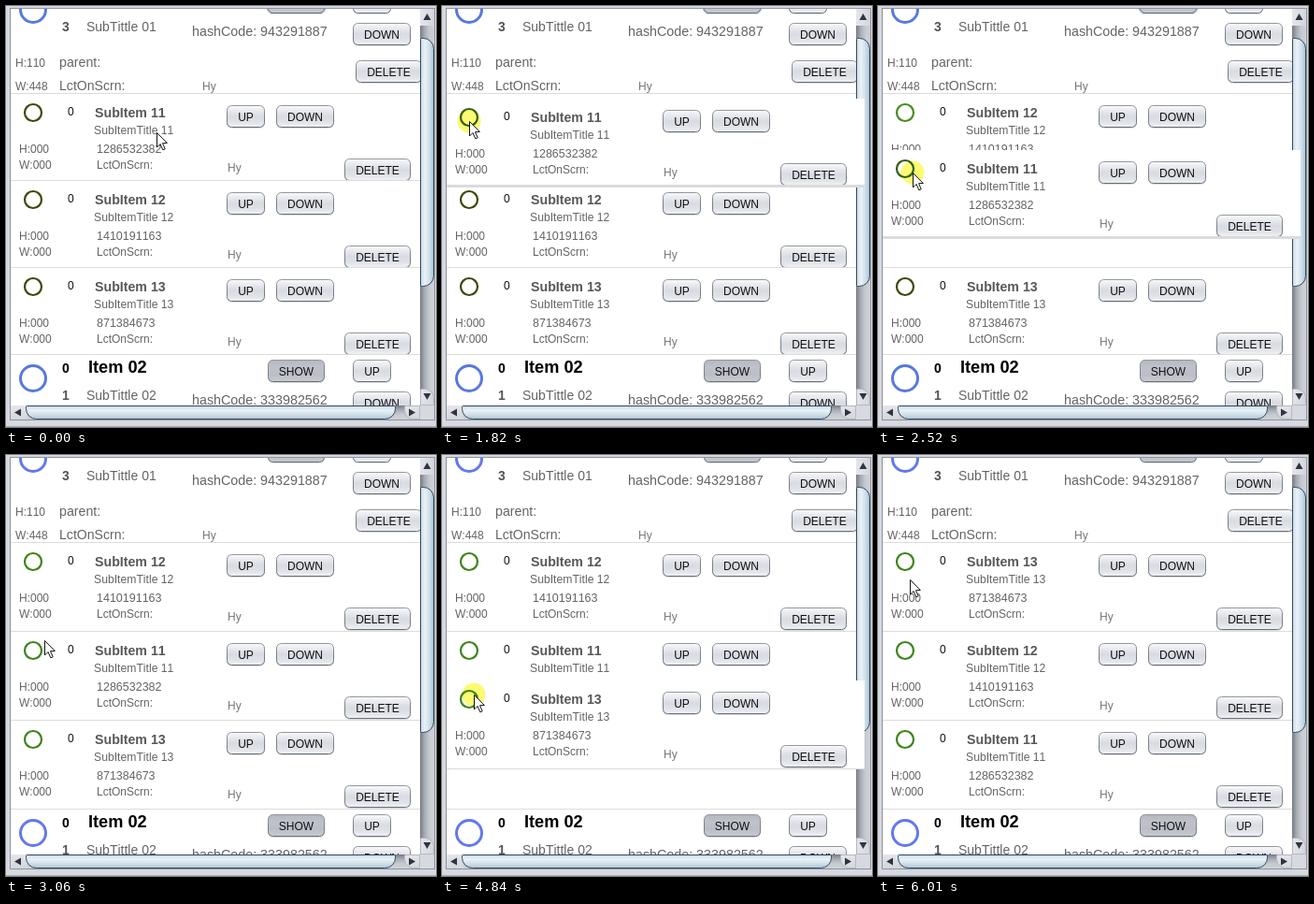
An HTML page with a canvas for the animation above (6290 ms loop, 460 by 450 pixels).

```html
<!DOCTYPE html>
<html>
<head>
<meta charset="utf-8">
<title>Drag to reorder</title>
<style>
html, body { margin: 0; width: 100%; height: 100%; overflow: hidden; background: #d6d9df; }
canvas { display: block; }
</style>
</head>
<body>
<canvas id="stage" width="460" height="450"></canvas>
<script>
const ctx = document.getElementById('stage').getContext('2d');
const LOOP = 6290, TICK = 70, RELAYOUT = 3060, LIST_TOP = 94;
const FONT = '"Liberation Sans", Arial, sans-serif';
const GREY = '#646464';
const TRACK = ['#767b85', '#a9adb6', '#c7cad1', '#cfd2d8'];
const THUMB = ['#c3d5e1', '#eaf2f7', '#cfdfe9', '#a6c1d3'];
const ARROW_BOX = ['#e4e6eb', '#d3d6dd'];
const HASHES = { 11: '1286532382', 12: '1410191163', 13: '871384673' };

// time, pointer x, pointer y, top of the dragged row
const PATH = [
  [0, 161, 135, 94], [460, 161, 135, 94], [940, 28, 118, 94], [1750, 28, 118, 94],
  [2100, 31, 143, 119], [2380, 35, 168, 144], [2800, 41, 198, 174], [3190, 41, 198, 174],
  [3820, 32, 301, 284], [4630, 32, 301, 284], [4840, 34, 256, 241], [5260, 34, 164, 146],
  [5330, 34, 156, 138], [5540, 34, 133, 115], [LOOP, 34, 133, 115]
];
const ORDERS = [[0, [11, 12, 13]], [2030, [12, 11, 13]], [4910, [12, 13, 11]], [5400, [13, 12, 11]]];
const HOLDS = [
  { row: 11, press: 1140, steps: 6, lift: 1490, release: 3060, drop: 3060 },
  { row: 13, press: 4020, steps: 7, lift: 4440, release: 5740, drop: 5940 }
];

function pose(time) {
  const i = PATH.findIndex(p => p[0] > time) - 1;
  const a = PATH[i], b = PATH[i + 1];
  const stepped = Math.floor((time - a[0]) / TICK) * TICK;
  const mix = stepped / (b[0] - a[0]);
  const [x, y, top] = [1, 2, 3].map(k => Math.round(a[k] + (b[k] - a[k]) * mix));
  return { x, y, top };
}

function rect(x, y, w, h, fill) {
  ctx.fillStyle = fill;
  ctx.fillRect(x, y, w, h);
}

function text(str, x, y, size = 12, color = GREY, weight = 'normal') {
  ctx.font = `${weight} ${size}px ${FONT}`;
  ctx.fontKerning = 'none';
  ctx.fillStyle = color;
  ctx.fillText(str, x, y);
}

function gradient(x0, y0, x1, y1, colors) {
  const g = ctx.createLinearGradient(x0, y0, x1, y1);
  colors.forEach((c, i) => g.addColorStop(i / (colors.length - 1), c));
  return g;
}

function rounded(x, y, w, h, r, fill, line) {
  ctx.beginPath();
  ctx.roundRect(x + .5, y + .5, w - 1, h - 1, r);
  ctx.fillStyle = fill;
  ctx.fill();
  ctx.strokeStyle = line;
  ctx.lineWidth = 1;
  ctx.stroke();
}

function ring(x, y, r, width, color, turn = 1) {
  ctx.beginPath();
  ctx.arc(x, y, r, -Math.PI / 2, Math.PI * (2 * turn - .5));
  ctx.strokeStyle = color;
  ctx.lineWidth = width;
  ctx.stroke();
}

function button(label, x, y, w, pressed) {
  const shades = pressed
    ? ['#b4b7bf', '#bfc2c9', '#bbbec6', '#c8cbd2']
    : ['#fbfbfc', '#e8eaee', '#d8dbe1', '#dfe2e7', '#f2f4f7'];
  const line = gradient(0, y, 0, y + 24, ['#93979f', '#686d77']);
  rounded(x, y + 1, w, 24, 5, 'transparent', '#d9dbdf');
  rounded(x, y, w, 24, 5, gradient(0, y, 0, y + 24, shades), line);
  ctx.textAlign = 'center';
  text(label, x + w / 2, y + 17, 12, '#111');
  ctx.textAlign = 'left';
}

function clipped(x, y, w, h, draw) {
  ctx.save();
  ctx.beginPath();
  ctx.rect(x, y, w, h);
  ctx.clip();
  draw();
  ctx.restore();
}

function group(top, number, count, hash, time) {
  const focused = time < RELAYOUT && number === '01';
  ring(29, top + 25, 13.5, 3, time < RELAYOUT ? '#5878e0' : '#6278f0');
  text('0', 60, top + 19, 14, '#000', 'bold');
  text('Item ' + number, 88, top + 19, 18.2, '#000', 'bold');
  text(count, 60, top + 48, 14, '#555', 'bold');
  text('SubTittle ' + number, 86, top + 48, 14);
  text('hashCode: ' + hash, 199, top + 53, 14.3);
  if (focused) rounded(279, top + 4, 63, 26, 6, '#73a4d1', '#8db3d6');
  button('SHOW', 280, top + 5, 61, true);
  button('UP', 371, top + 5, 41);
  button('DOWN', 371, top + 39, 62);
  button('DELETE', 374, top + 79, 71);
  text('H:110', 10, top + 86);
  text('parent:', 57, top + 86, 14.2);
  text('W:448', 10, top + 111);
  text('LctOnScrn:', 57, top + 111, 14.1);
  text('Hy', 210, top + 111, 12, '#777');
}

function row(id, top, height, color, turn) {
  clipped(5, top, 438, height - 1, () => {
    ring(29, top + 20, 9, 2.2, color, turn);
    text('0', 66, top + 23, 12, '#111');
    text('SubItem ' + id, 95, top + 25, 14.2, '#585858', 'bold');
    text('SubItemTitle ' + id, 94, top + 43, 12.2);
    text('H:000', 14, top + 63);
    text('W:000', 14, top + 80);
    text(HASHES[id], 97, top + 63, 12.5);
    text('LctOnScrn:', 97, top + 80);
    text('Hy', 237, top + 83, 12, '#777');
    button('UP', 236, top + 12, 41);
    button('DOWN', 289, top + 12, 62);
    button('DELETE', 362, top + 69, 71);
  });
}

function arrow(x, y, dx, dy) {
  ctx.beginPath();
  ctx.moveTo(x + dx * 4, y + dy * 4);
  ctx.lineTo(x - dx * 3 + dy * 4, y - dy * 3 + dx * 4);
  ctx.lineTo(x - dx * 3 - dy * 4, y - dy * 3 - dx * 4);
  ctx.fillStyle = '#30343b';
  ctx.fill();
}

// Thumbs are square along the list and curved along the outer edge.
function scrollbars(time) {
  const thumbEnd = time < RELAYOUT ? 300 : 297;
  const across = colors => gradient(443, 0, 458, 0, colors);
  const down = colors => gradient(0, 427, 0, 442, colors);

  rect(443, 3, 15, 424, across(TRACK));
  rect(443, 3, 15, 18, across(ARROW_BOX));
  rounded(443, 409, 15, 18, [1, 9, 0, 0], across(ARROW_BOX), '#b4b8c0');
  rounded(443, 34, 15, thumbEnd - 34, [1, 11, 11, 1], across(THUMB), '#34495e');
  arrow(450.5, 12, 0, -1);
  arrow(450.5, 417, 0, 1);

  rect(5, 427, 438, 15, down(TRACK));
  rect(5, 427, 18, 15, down(ARROW_BOX));
  rounded(426, 427, 17, 15, [1, 0, 0, 9], down(ARROW_BOX), '#b4b8c0');
  rounded(21, 427, 396, 15, [1, 1, 11, 11], down(THUMB), '#34495e');
  arrow(13, 434.5, -1, 0);
  arrow(434, 434.5, 1, 0);
}

function highlight(x, y) {
  ctx.save();
  ctx.globalCompositeOperation = 'multiply';
  ctx.beginPath();
  ctx.arc(x, y, 12.5, 0, Math.PI * 2);
  ctx.fillStyle = '#fdfb74';
  ctx.fill();
  ctx.restore();
}

function pointer(x, y) {
  ctx.beginPath();
  [[.5, .5], [.5, 16], [4, 12.5], [6.8, 18.8], [9.2, 17.8], [6.5, 11.7], [11.3, 11.5]]
    .forEach(([dx, dy]) => ctx.lineTo(x + dx, y + dy));
  ctx.closePath();
  ctx.fillStyle = '#fff';
  ctx.fill();
  ctx.strokeStyle = '#111';
  ctx.lineWidth = 1;
  ctx.stroke();
}

function ringColor(id, time) {
  if (time >= RELAYOUT) return '#3c8418';
  if (id === 12 && time >= 2030) return '#468c22';
  if (id === 11 && time >= 1490) return '#2f5f12';
  return '#404508';
}

function ringTurn(id, time) {
  const hold = HOLDS.find(h => h.row === id && time >= h.press && time < h.lift);
  if (!hold) return 1;
  const step = Math.floor((time - hold.press) / TICK);
  return .11 + .89 * step / (hold.steps - 1);
}

function draw(time) {
  const { x, y, top } = pose(time);
  const height = time < RELAYOUT ? 93 : 95;
  const order = ORDERS.filter(o => o[0] <= time).pop()[1];
  const dragged = HOLDS.find(h => time >= h.lift && time < h.drop);

  rect(0, 0, 460, 450, '#d6d9df');
  rect(4, 2, 455, 441, '#8d929b');
  rect(5, 3, 453, 439, '#d6d9df');
  rect(0, 449, 460, 1, '#a5a9b2');

  clipped(5, 3, 438, 424, () => {
    rect(5, 3, 438, 424, '#fff');
    group(-21, '01', '3', '943291887', time);
    rect(5, LIST_TOP - 1, 438, 1, '#dcdcdc');
    order.forEach((id, i) => {
      const slot = LIST_TOP + i * height;
      if (!dragged || dragged.row !== id) row(id, slot, height, ringColor(id, time), ringTurn(id, time));
      rect(5, slot + height - 1, 438, 1, '#dcdcdc');
    });
    group(LIST_TOP + 3 * height, '02', '1', '333982562', time);
  });
  scrollbars(time);

  if (dragged) {
    const edge = dragged.row === 11 ? 3 : 1;
    rect(5, top, 447, 95, '#fff');
    row(dragged.row, top, 95, ringColor(dragged.row, time), 1);
    rect(5, top + 95 - edge, 447, edge, '#dadbdd');
  }
  if (HOLDS.some(h => time >= h.press && time < h.release)) highlight(x, y);
  pointer(x, y);
}

function frame() {
  draw(performance.now() % LOOP);
  requestAnimationFrame(frame);
}
frame();
</script>
</body>
</html>
```
